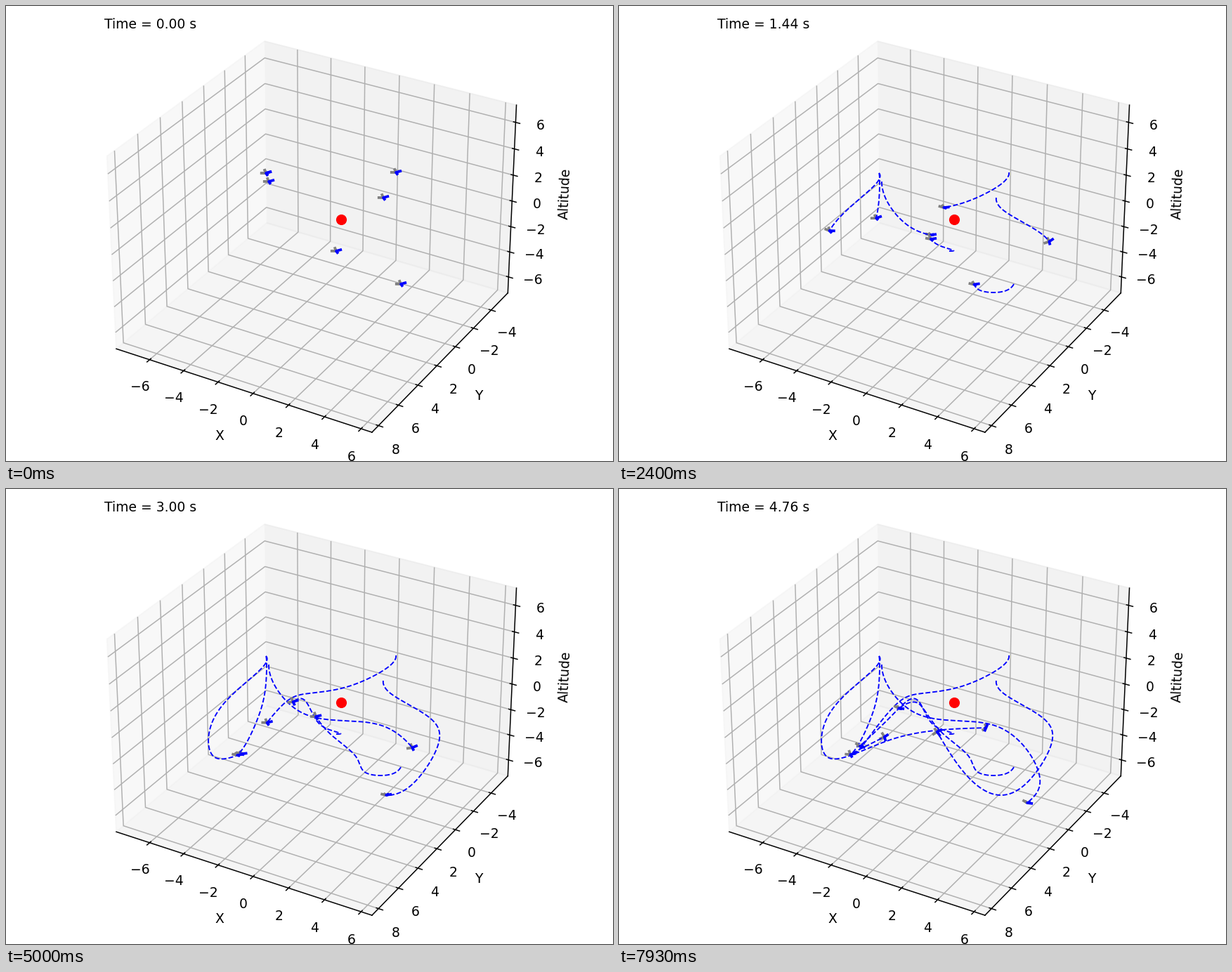
A matplotlib script that plays this animation: 864 px wide and 648 px high, repeating every 8000 ms.

```python
import numpy as np
import matplotlib.pyplot as plt
from matplotlib.animation import FuncAnimation

W, H, DPI = 864, 648, 135
STEPS, STEP_MS = 200, 40   # drawn steps in one 8000 ms loop
TICKS = 120                # simulation ticks shown in that loop
DT = 0.04                  # simulated seconds per tick
SUB = 4                    # path samples per tick
KEY_TICKS = np.array([0, 15, 30, 45, 60, 90, 120])
HALF = 7.2917              # half width of the plotted cube
MID = (-0.7, 1.35, 0)
GRAVITY = 9.81

# Stage pixels per unit along the x, y and altitude axes.
BASIS = np.array([[24.7, -14.3, 0.0],
                  [7.1, 12.4, -18.6]])


def spline(t, p):
    """Cubic spline through points p at ticks t, starting at rest."""
    n, h = len(t), np.diff(t)
    slope = np.diff(p, axis=0) / h[:, None]
    A, b = np.eye(n), np.zeros((n, 2))
    A[0, :2] = 2 * h[0], h[0]
    b[0] = 6 * slope[0]
    for k in range(1, n - 1):
        A[k, k - 1:k + 2] = h[k - 1], 2 * (h[k - 1] + h[k]), h[k]
        b[k] = 6 * (slope[k] - slope[k - 1])
    m = np.linalg.solve(A, b)

    s = np.arange((TICKS - 1) * SUB + 1) / SUB
    k = np.searchsorted(t, s, side="right") - 1
    hk = h[k][:, None]
    u = (t[k + 1] - s)[:, None]
    v = (s - t[k])[:, None]
    return ((m[k] * u**3 + m[k + 1] * v**3) / (6 * hk)
            + (p[k] / hk - m[k] * hk / 6) * u
            + (p[k + 1] / hk - m[k + 1] * hk / 6) * v)


class Drone:
    ARM, RISE = 0.16, 0.05

    def __init__(self, layer, *points):
        self.path = spline(KEY_TICKS, np.array(points, float))
        self.rear, = layer.plot([], [], color="gray", lw=2)
        self.front, = layer.plot([], [], color="blue", lw=2)
        self.trail, = layer.plot([], [], "--", color="blue", lw=1)

    def at(self, i):
        return self.path[np.clip(i, 0, TICKS - 1) * SUB]

    def thrust(self, i, span=5):
        """Thrust direction that yields the acceleration along the path."""
        acc = self.at(i + span) - 2 * self.at(i) + self.at(i - span)
        acc = np.linalg.solve(BASIS[:, :2], acc / (span * DT) ** 2)
        acc *= min(1, i / 6)
        up = np.array([*acc, GRAVITY])
        return up / np.linalg.norm(up)

    def update(self, i):
        up = self.thrust(i)
        fwd = np.array([1, 0, 0]) - up[0] * up
        fwd /= np.linalg.norm(fwd)
        side = np.cross(up, fwd)
        pos = self.at(i)[:, None]
        for line, nose in ((self.rear, -fwd), (self.front, fwd)):
            arms = [self.ARM * (nose - side) + self.RISE * up,
                    np.zeros(3),
                    self.ARM * (nose + side) + self.RISE * up]
            line.set_data(*(BASIS @ np.transpose(arms) + pos))
        self.trail.set_data(*self.path[:i * SUB].T)


fig = plt.figure(figsize=(W / DPI, H / DPI), dpi=DPI)
ax = fig.add_axes([0, 0, 1, 1], projection="3d")
ax.set_xlim(MID[0] - HALF, MID[0] + HALF)
ax.set_ylim(MID[1] + HALF, MID[1] - HALF)
ax.set_zlim(MID[2] - HALF, MID[2] + HALF)
ax.set_xticks(range(-6, 7, 2))
ax.set_yticks(range(-4, 9, 2))
ax.set_zticks(range(-6, 7, 2))
ax.set_xlabel("X")
ax.set_ylabel("Y")
ax.set_zlabel("Altitude")
ax.scatter(0, 0, 0, color="red", s=50, depthshade=False)
clock = ax.text2D(0.05, 0.95, "", transform=ax.transAxes)

layer = fig.add_axes([0, 0, 1, 1])
layer.set(xlim=(0, W), ylim=(H, 0))
layer.axis("off")

drones = [
    Drone(layer, (370, 238), (366, 253), (315, 300), (289, 348),
          (297, 382), (393, 355), (527, 340)),
    Drone(layer, (370, 238), (371, 247), (369, 286), (359, 325),
          (342, 362), (330, 378), (380, 352)),
    Drone(layer, (374, 250), (380, 275), (420, 318), (482, 330),
          (538, 338), (598, 406), (580, 448)),
    Drone(layer, (555, 237), (546, 252), (488, 281), (431, 291),
          (400, 302), (347, 365), (329, 378)),
    Drone(layer, (537, 273), (546, 290), (598, 322), (616, 361),
          (582, 417), (506, 419), (451, 343)),
    Drone(layer, (470, 349), (476, 348), (452, 339), (436, 319),
          (424, 300), (389, 322), (341, 368)),
    Drone(layer, (562, 396), (549, 406), (512, 404), (498, 381),
          (465, 352), (427, 306), (397, 313)),
]


def update(step):
    i = (3 * step + 1) // 5   # 15 ticks per second, rounded to the step grid
    clock.set_text(f"Time = {i * DT:.2f} s")
    for drone in drones:
        drone.update(i)


anim = FuncAnimation(fig, update, frames=STEPS, interval=STEP_MS,
                     init_func=lambda: update(0), repeat=True,
                     repeat_delay=0, blit=False)
plt.show()
```
